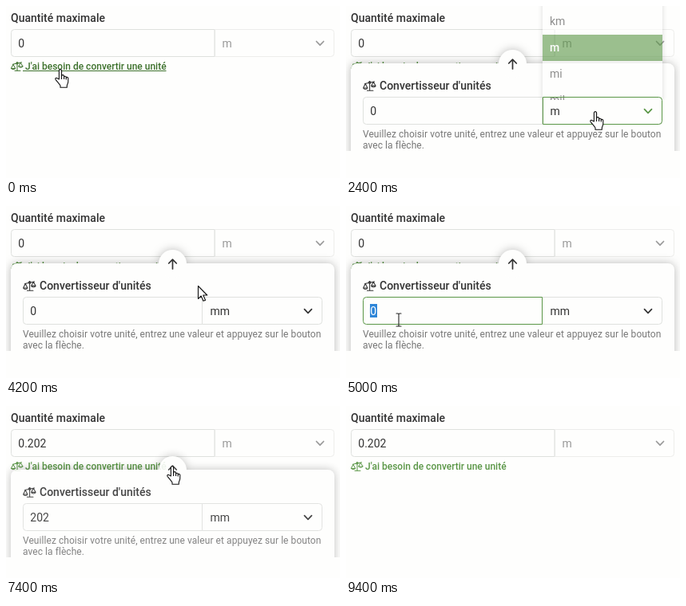
An HTML page that plays this animation: 418x216 px, repeating every 9800 ms.

```html
<!DOCTYPE html>
<html lang="fr">
<head>
<meta charset="utf-8">
<title>Convertisseur d'unités</title>
<style>
  html, body { margin: 0; width: 100%; height: 100%; overflow: hidden; background: #fefefd; }
  svg { display: block; width: 418px; height: 216px; font: 400 14px Roboto, sans-serif; fill: #333; }
  .bold { font-weight: 500; }
  .link { font-size: 12px; font-weight: 500; fill: #5a9646; }
  .help { font-size: 12px; letter-spacing: .06px; fill: #777; }
  .box { fill: #fefefd; stroke: #dfe1de; }
  .line { fill: none; stroke: #333; stroke-width: 1.7; stroke-linecap: round; stroke-linejoin: round; }
  .icon { fill: none; stroke: currentColor; stroke-linecap: round; stroke-linejoin: round; }
  .sheet { fill: #fefefd; filter: drop-shadow(0 0 6px rgba(0, 0, 0, .27)); }
  .menu { fill: #fefefd; filter: drop-shadow(0 1px 3px rgba(0, 0, 0, .25)); }
  .pointer { fill: #fff; stroke: #111; stroke-width: 1.1; stroke-linejoin: round; }
</style>
</head>
<body>
<svg viewBox="0 0 418 216">
  <defs>
    <g id="scale" class="icon">
      <path d="M8 1.5V12M5 12.3h7M2.5 4.2L13.5 1.8"/>
      <path d="M.6 9.2L3 4.2l2.5 5zc.6 2 4.300 2 4.900 0M9.900 6.800L12.300 2l2.600 4.800zc.6 2 4.400 2 5 0"/>
      <circle cx="8" cy="2.800" r="1.200"/>
    </g>
    <clipPath id="panelClip"><rect y="40" width="418" height="142"/></clipPath>
    <clipPath id="menuClip"><rect x="236" y="-20" width="170" height="138"/></clipPath>
  </defs>

  <text class="bold" x="6" y="20">Quantité maximale</text>
  <path class="box" style="stroke:#ededeb" d="M261.500 29.500H406.500a4 4 0 0 1 4 4V59.500a4 4 0 0 1-4 4H261.500z"/>
  <path id="field" class="box" d="M261 29.500H10.500a4 4 0 0 0-4 4V59.500a4 4 0 0 0 4 4H261z"/>
  <text id="result" x="15.300" y="52"></text>
  <text x="270.500" y="52" fill="#999">m</text>
  <path class="line" style="stroke:#999" d="M388.500 44.500l4.500 4.700 4.500-4.700"/>
  <g id="link" class="link">
    <use id="linkIcon" href="#scale" x="6" y="69"/>
    <text x="24" y="80">J'ai besoin de convertir une unité</text>
    <path id="underline" d="M21 81h179.500v1H21z"/>
  </g>

  <g id="panel">
    <g clip-path="url(#panelClip)">
      <g class="sheet">
        <rect x="6" y="72" width="405" height="140" rx="8"/>
        <circle cx="208.500" cy="72.500" r="17.500"/>
      </g>
      <path class="line" d="M208.500 79V67.500M203.700 72l4.800-4.800 4.800 4.800"/>
      <use href="#scale" color="#333" transform="translate(21 93) scale(1.080)"/>
      <text class="bold" x="42" y="105">Convertisseur d'unités</text>
      <path class="box" d="M245.500 114.500H391.500a4 4 0 0 1 4 4V144.500a4 4 0 0 1-4 4H245.500z"/>
      <path id="input" class="box" d="M245.500 114.500H25.500a4 4 0 0 0-4 4V144.500a4 4 0 0 0 4 4H245.500z"/>
      <rect id="selection" x="30" y="123" width="9" height="17" fill="#2f86d8"/>
      <text id="amount" x="30.300" y="137"></text>
      <text class="help" x="21" y="165">Veuillez choisir votre unité, entrez une valeur et appuyez sur le bouton</text>
      <text class="help" x="21" y="179">avec la flèche.</text>
    </g>
    <g id="menu" clip-path="url(#menuClip)">
      <rect class="menu" x="246" y="-20" width="150" height="138"/>
      <rect id="hover" x="246" width="150" height="33" fill="#5a9646"/>
      <g id="items"></g>
    </g>
    <path id="select" fill="none" d="M246.500 114.500H391.500a4 4 0 0 1 4 4V144.500a4 4 0 0 1-4 4H246.500z"/>
    <text id="unit" x="255.500" y="137"></text>
    <path id="chevron" class="line" d="M373.500 129.700l4.500 4.700 4.500-4.700"/>
  </g>

  <g id="arrow" class="pointer"><path d="M.5.500V16.500L4.200 13l2.800 6.300 2.600-1.100L6.800 12H11.800z"/></g>
  <g id="hand" class="pointer">
    <path d="M-1.600 13V2.200a1.600 1.600 0 0 1 3.200 0V9a1.500 1.500 0 0 1 3 .3v.8a1.400 1.400 0 0 1 2.700.4v.7a1.300 1.300 0 0 1 2.500.5V16c0 2.500-1.500 3.500-1.500 5v2.300H0V21C-1.500 18.500-4.500 15.500-6 13.200c-.8-1.500 1-2.600 2.200-1.400z"/>
    <path fill="none" d="M1.600 9v4M4.600 10v3M7.300 11v2.500"/>
  </g>
  <g id="beam"><path class="line" style="stroke:#222;stroke-width:1.100" d="M-3-8h2q1 0 1 1 0-1 1-1h2M0-7V7M-3 8h2q1 0 1-1 0 1 1 1h2"/></g>
</svg>
<script>
const LOOP = 9800, STEP = 200, ROW = 33, GREEN = '#5a9646', GREY = '#dfe1de';
const units = ['km', 'm', 'mi', 'mil', 'mm', 'nm', 'NM'];
const pointers = ['arrow', 'hand', 'beam'];
const $ = id => document.getElementById(id);

// time, x, y, pointer shape
const path = [
  [0, 68, 79, 'hand'], [1000, 68, 79, 'arrow'], [1200, 68, 79, 'arrow'],
  [1800, 130, 122, 'beam'], [2200, 312, 132, 'hand'], [3000, 312, 132, 'hand'],
  [3600, 285, 62, 'hand'], [4000, 285, 62, 'hand'], [4200, 240, 100, 'arrow'],
  [4400, 150, 128, 'beam'], [4600, 66, 143, 'beam'], [5000, 66, 143, 'beam'],
  [5400, 148, 165, 'beam'], [6600, 148, 165, 'beam'], [6800, 182, 112, 'arrow'],
  [7000, 208, 75, 'hand'], [7400, 208, 75, 'hand'], [7600, 195, 73, 'arrow'],
  [8000, 123, 67, 'arrow'], [8800, 110, 61, 'arrow'], [9200, 110, 52, 'beam'],
  [9400, 110, 52, 'none']
];
// time, offset, opacity
const slide = [
  [0, 30, 0], [600, 30, 0], [800, 21, .5], [1000, 5, .9], [1200, 0, 1],
  [7200, 0, 1], [7400, 8, .9], [7600, 28, .5], [7800, 30, 0]
];
const scrolling = [[0, 0], [3400, 0], [3800, 3 * ROW]];
const typed = [[0, '0'], [5600, '2'], [5800, '20'], [6000, '202']];

const current = (table, t) => table.findLast(row => row[0] <= t);

function tween(table, t, col) {
  const a = current(table, t), b = table[table.indexOf(a) + 1];
  return b ? a[col] + (b[col] - a[col]) * (t - a[0]) / (b[0] - a[0]) : a[col];
}

const set = (id, attrs) => {
  for (const key in attrs) $(id).setAttribute(key, attrs[key]);
};
const show = (id, on) => { $(id).style.display = on ? '' : 'none'; };

const labels = units.map((name, i) => {
  const label = document.createElementNS('http://www.w3.org/2000/svg', 'text');
  label.textContent = name;
  label.setAttribute('x', 255);
  label.setAttribute('y', 24 + ROW * i);
  $('items').append(label);
  return label;
});

function drawMenu(t, y) {
  const open = t >= 2400 && t < 4000, scroll = tween(scrolling, t, 1);
  const active = y < 114 ? Math.floor((y - 3 + scroll) / ROW) : 1;
  show('menu', open);
  $('menu').style.opacity = t < 2600 ? .6 : 1;
  set('items', { transform: `translate(0 ${-scroll})` });
  set('hover', { y: 3 + ROW * active - scroll });
  labels.forEach((label, i) => {
    label.style.fill = i === active ? '#fff' : '#444';
    label.style.fontWeight = i === active ? 500 : 400;
  });
  set('select', { stroke: open ? GREEN : 'none' });
  $('chevron').style.stroke = open ? GREEN : '#333';
  $('unit').textContent = t < 4000 ? 'm' : 'mm';
}

function draw(t) {
  const x = tween(path, t, 1), y = tween(path, t, 2), kind = current(path, t)[3];
  for (const name of pointers) {
    show(name, name === kind);
    set(name, { transform: `translate(${x} ${y})` });
  }

  const linked = t < 800;
  show('underline', linked);
  $('link').style.fill = linked ? '#3d712c' : GREEN;
  $('linkIcon').style.color = linked ? '#3d712c' : GREEN;
  $('result').textContent = t < 7400 ? '0' : '0.202';
  $('field').style.stroke = kind === 'beam' && t >= 9000 ? '#c9ccc7' : GREY;

  const opacity = tween(slide, t, 2);
  show('panel', opacity > 0);
  $('panel').style.opacity = opacity;
  set('panel', { transform: `translate(0 ${tween(slide, t, 1)})` });

  const selected = t >= 5000 && t < 5600;
  $('input').style.stroke = t >= 4800 && t < 7400 ? GREEN : GREY;
  show('selection', selected);
  $('amount').textContent = current(typed, t)[1];
  $('amount').style.fill = selected ? '#fff' : '#333';
  drawMenu(t, y);
}

const start = performance.now();
function tick() {
  const t = (performance.now() - start) % LOOP;
  draw(Math.floor(t / STEP) * STEP);
  requestAnimationFrame(tick);
}
tick();
</script>
</body>
</html>
```
